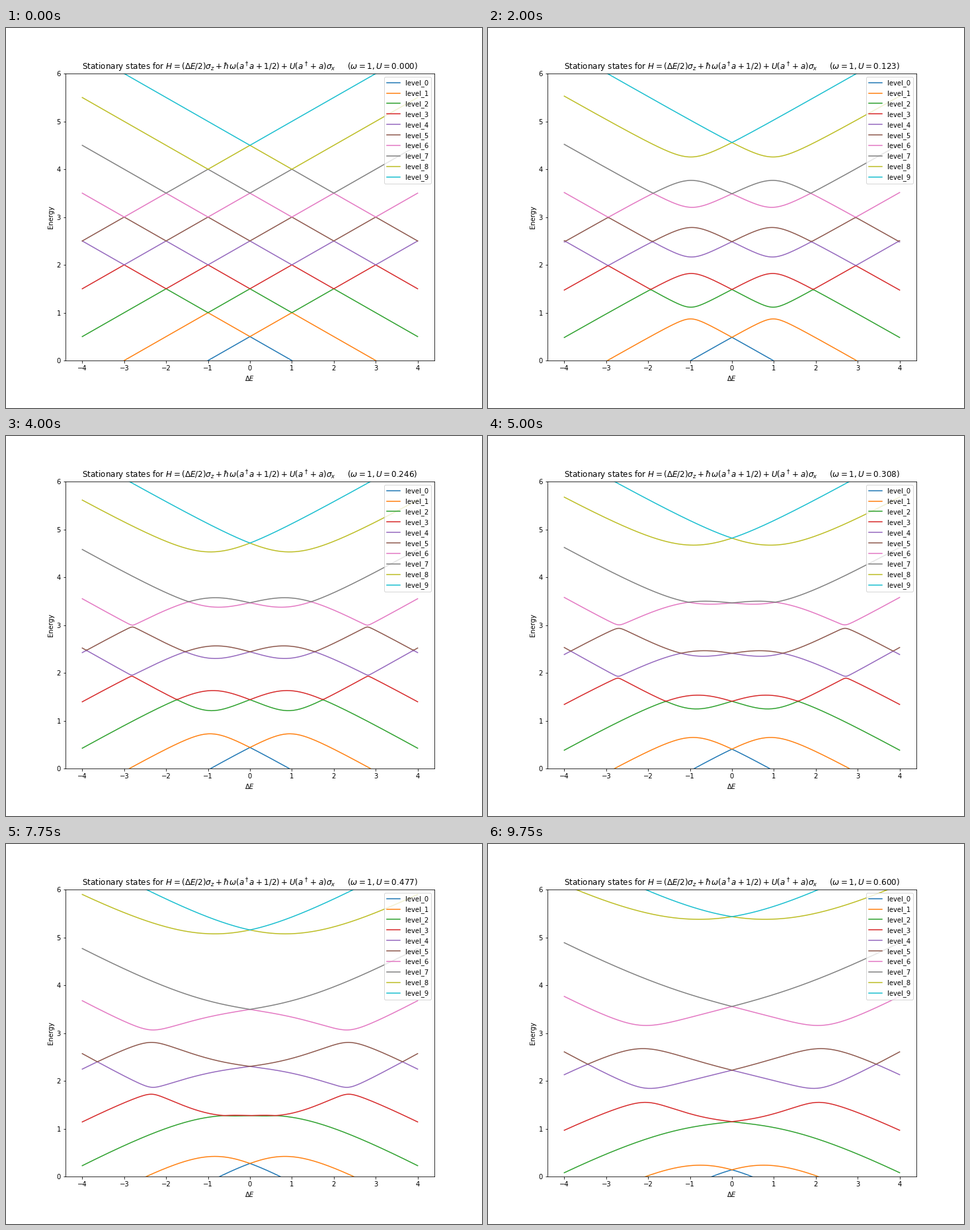
A matplotlib script for the animation above (10 s loop, 720 by 576 pixels).

```python
import numpy as np
import matplotlib.pyplot as plt
from matplotlib.animation import FuncAnimation

FRAMES = 40
INTERVAL = 250
N_PHOTON = 5
U_MAX = 0.6

plt.rcParams.update({"font.family": "DejaVu Sans", "font.size": 10})

# Operators on the (two-level) x (oscillator) space
sz = np.diag([1.0, -1.0])
sx = np.array([[0.0, 1.0], [1.0, 0.0]])
a = np.diag(np.sqrt(np.arange(1, N_PHOTON)), 1)
splitting = np.kron(sz / 2, np.eye(N_PHOTON))
oscillator = np.kron(np.eye(2), a.T @ a + np.eye(N_PHOTON) / 2)
coupling = np.kron(sx, a.T + a)

delta = np.linspace(-4, 4, 201)
strengths = np.linspace(0, U_MAX, FRAMES)


def energies(u):
    h = delta[:, None, None] * splitting + oscillator + u * coupling
    return np.linalg.eigvalsh(h)


def title_text(u):
    return (r"Stationary states for "
            r"$H=(\Delta E/2)\sigma_z+\hbar\omega(a^\dagger a+1/2)"
            r"+U(a^\dagger+a)\sigma_x$"
            rf"     ($\omega=1, U={u:.3f}$)")


fig, ax = plt.subplots(figsize=(10, 8), dpi=72)
fig.subplots_adjust(left=0.125, right=0.9, bottom=0.125, top=0.88)

lines = [ax.plot(delta, level, label=f"level_{i}")[0]
         for i, level in enumerate(energies(0).T)]
ax.set_xlim(-4.4, 4.4)
ax.set_ylim(0, 6)
ax.set_xlabel(r"$\Delta E$")
ax.set_ylabel("Energy")
ax.legend(loc="upper right")
title = ax.set_title(title_text(0))


def update(frame):
    u = strengths[frame]
    for line, level in zip(lines, energies(u).T):
        line.set_ydata(level)
    title.set_text(title_text(u))
    return [*lines, title]


anim = FuncAnimation(fig, update, frames=FRAMES, interval=INTERVAL,
                     repeat=True, repeat_delay=0)
plt.show()
```
